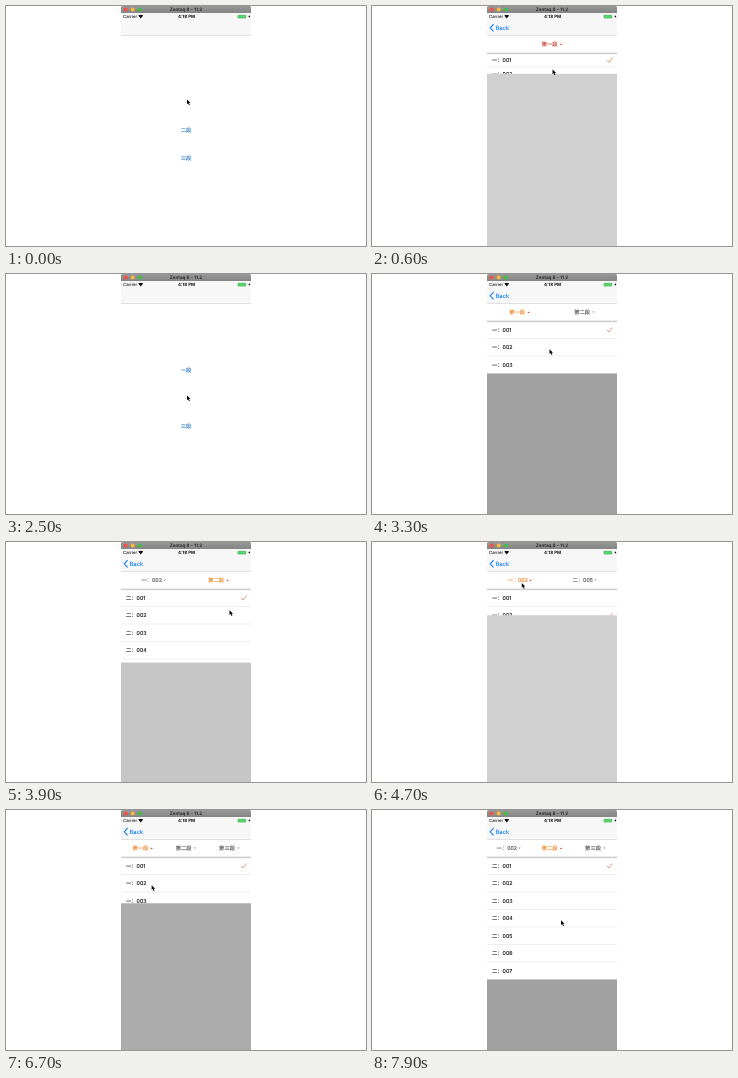
Write an HTML page that moves like this. It is 360 by 240 pixels and loops after 8000 ms.

```html
<!DOCTYPE html>
<html lang="zh">
<head>
<meta charset="utf-8">
<style>
html, body { margin: 0; width: 100%; height: 100%; overflow: hidden; background: #fff; }
svg { display: block; width: 360px; height: 240px; }
text { font-family: Inter, "Noto Sans CJK SC", "Noto Sans CJK", sans-serif; font-size: 5.3px; text-rendering: geometricPrecision; }
</style>
</head>
<body>
<svg viewBox="0 0 360 240">
  <defs>
    <linearGradient id="bar" x2="0" y2="1"><stop stop-color="#989898"/><stop offset="1" stop-color="#858585"/></linearGradient>
    <linearGradient id="shade" x2="0" y2="1"><stop stop-color="#b4b4b4"/><stop offset="1" stop-color="#b4b4b4" stop-opacity="0"/></linearGradient>
    <clipPath id="screen"><path d="M115 29h130v211H115z"/></clipPath>
  </defs>
  <g id="view" clip-path="url(#screen)"></g>
  <path d="M115 7h130v22H115z" fill="#f7f7f7"/>
  <path d="M115 29.5h130" stroke="#d8d8d8" stroke-width=".8"/>
  <g id="back">
    <path d="M121.6 18.2l-3.4 3.6 3.4 3.6" fill="none" stroke="#1480f5" stroke-width="1.1"/>
    <text x="123.5" y="24" fill="#1480f5" stroke="#1480f5" stroke-width=".12" style="font-size:5.9px">Back</text>
  </g>
  <g fill="#111">
    <text x="117" y="12.1" style="font-size:4.3px;font-weight:500">Carrier</text>
    <text x="180.5" y="12.1" text-anchor="middle" style="font-size:4.4px;font-weight:700">4:18 PM</text>
    <path d="M134.7 12.4l-2.5-2.8q2.5-1.8 5 0z"/>
    <path d="M242.3 10.9l1.5-2.2-.3 1.4h.9l-1.5 2.2.3-1.4z"/>
  </g>
  <rect x="231.8" y="9" width="8.2" height="3.2" rx=".7" fill="#4cd964" stroke="#7a9a7e" stroke-width=".4"/>
  <path d="M115 7V1.5Q115 0 116.5 0h127Q245 0 245 1.5V7z" fill="url(#bar)"/>
  <circle cx="119.6" cy="3.5" r="2.1" fill="#f45249"/>
  <circle cx="126.7" cy="3.5" r="2.1" fill="#f6b73c"/>
  <circle cx="133.8" cy="3.5" r="2.1" fill="#3fc046"/>
  <text x="180" y="5.1" text-anchor="middle" fill="#222" style="font-size:4.6px;font-weight:600">Zentaq 8 - 11.2</text>
  <path id="cursor" d="M0 0v4.8l1.1-1 .9 2 .9-.4-.9-1.9h1.5z" stroke="#fff" stroke-width=".4" paint-order="stroke"/>
</svg>
<script>
const LOOP = 8000, LEFT = 115, WIDTH = 130, TOP = 47;
const NUM = '一二三';
const $ = id => document.getElementById(id);

// Taps follow the home button at a steady gap:
// a letter toggles that column, a digit picks that row, "<" goes back.
const pages = [
  { at: 60, gap: 390, taps: 'A2AA<', reach: 0, rowH: 13.9, tint: '#c23a2c', tick: '#e08a55' },
  { at: 2500, gap: 410, taps: 'A2B5AA<', reach: 30, rowH: 17.5, tint: '#ee8420', tick: '#f08c8c' },
  { at: 5985, gap: 480, taps: 'A2B4', reach: 9, rowH: 17.5, tint: '#ee8420', tick: '#f08c8c' }
];
const menus = [], stops = [];

const center = (page, col) => LEFT + WIDTH * (col + .5) / (page + 1);

pages.forEach((p, page) => {
  let menu = null;
  p.back = Infinity;
  stops.push({ t: p.at, x: 181, y: 93.5 + 28 * page });
  [...p.taps].forEach((key, i) => {
    const t = p.at + p.gap * (i + 1);
    if (key === '<') {
      p.back = t;
      stops.push({ t, x: 124, y: 21 });
    } else if (key >= 'A') {
      const col = key.charCodeAt() - 65;
      stops.push({ t, x: center(page, col) + 2.3, y: 41 });
      if (menu) {
        menu.close = t;
        menu = null;
      } else {
        menus.push(menu = { page, col, open: t, close: Infinity, rows: 3 + 4 * col });
      }
    } else {
      stops.push({ t, x: center(page, menu.col) + p.reach, y: TOP + p.rowH * (key - .5) + 2 });
      menu.close = t;
      menu.pick = key - 1;
      menu = null;
    }
  });
});

const ease = x => { x = Math.min(1, Math.max(0, x)); return x * x * (3 - 2 * x); };
const span = (t, from, to, len) => ease((t - from) / len) - ease((t - to) / len);
const text = (x, y, s, fill, anchor = 'middle') =>
  `<text x="${x}" y="${y}" fill="${fill}" stroke="${fill}" stroke-width=".15" text-anchor="${anchor}">${s}</text>`;
const box = (y, bottom, attrs) => `<path d="M${LEFT} ${y}h${WIDTH}V${bottom}H${LEFT}z" ${attrs}/>`;
const item = (col, row) => `${NUM[col]}：00${row + 1}`;

function pickedRow(page, col, t) {
  return menus.filter(m => m.page === page && m.col === col && t >= m.close && m.pick >= 0).pop()?.pick;
}

function home(t) {
  return pages.map((p, i) => t >= p.at - 70 && t < p.at + 250 ? '' :
    text(180, 98 + 28 * i, NUM[i] + '段', '#2f7fc4')).join('');
}

function tab(page, col, t) {
  const c = center(page, col), row = pickedRow(page, col, t), picked = row !== undefined;
  const on = menus.some(m => m.page === page && m.col === col && t >= m.open && t < m.close);
  const fill = on ? pages[page].tint : '#555', x = c + (picked ? 11 : 9);
  return text(c - (picked ? 1.8 : 2.3), 40.1, picked ? item(col, row) : `第${NUM[col]}段`, fill) +
    `<path d="M${x - 1.2} ${on ? 39 : 37.4}h2.4l-1.2 ${on ? -1.6 : 1.6}z" fill="${on ? '#e0402c' : '#999'}"/>`;
}

function list(m, t) {
  const p = pages[m.page], k = span(t, m.open, m.close, 300);
  if (k <= 0) return '';
  const bottom = TOP + k * m.rows * p.rowH, checked = pickedRow(m.page, m.col, t) ?? 0;
  let s = '';
  for (let i = 0; i < m.rows; i++) {
    const y = TOP + p.rowH * (i + .5);
    s += text(120, y + 1.9, item(m.col, i), '#1a1a1a', 'start') +
      `<path d="M${LEFT} ${y + p.rowH / 2}h${WIDTH}" stroke="#dedede" stroke-width=".5"/>`;
    if (i === checked)
      s += `<path d="M235 ${y + .3}l2 2 3.6-4.6" fill="none" stroke="${p.tick}" stroke-width=".9"/>`;
  }
  return s + box(bottom, 240, 'fill="#fff"') + box(bottom, 240, `opacity="${.37 * k}"`);
}

function pageView(n, t) {
  let s = box(29, 240, 'fill="#fff"');
  for (const m of menus) if (m.page === n) s += list(m, t);
  s += box(29, TOP, 'fill="#fff"') + box(TOP - .2, TOP + 1.8, 'fill="url(#shade)"');
  for (let col = 0; col <= n; col++) s += tab(n, col, t);
  return s;
}

// The pointer rests briefly after a tap, then heads for the next one at a steady speed.
function pointer(t) {
  const i = stops.findIndex(s => s.t > t), b = stops[i], a = stops[i - 1] ?? b;
  const dx = b.x - a.x, dy = b.y - a.y, rest = 60;
  const time = Math.min(b.t - a.t - rest, 4 * Math.hypot(dx, dy));
  const k = time > 0 ? Math.min(1, Math.max(0, (t - a.t - rest) / time)) : 1;
  return `translate(${a.x + dx * k} ${a.y + dy * k})`;
}

function draw(now) {
  const t = Math.floor(now % LOOP / 100) * 100;
  const shown = pages.map(p => span(t, p.at, p.back, 350));
  const q = Math.max(...shown), n = shown.indexOf(q);
  $('view').innerHTML = `<g transform="translate(${-39 * q})">${home(t)}</g>` +
    (q > 0 ? `<g transform="translate(${WIDTH * (1 - q)})">${pageView(n, t)}</g>` : '');
  $('back').setAttribute('opacity', q);
  $('cursor').setAttribute('transform', pointer(t));
}

const start = performance.now();
function tick() {
  draw(performance.now() - start);
  requestAnimationFrame(tick);
}
tick();
</script>
</body>
</html>
```
